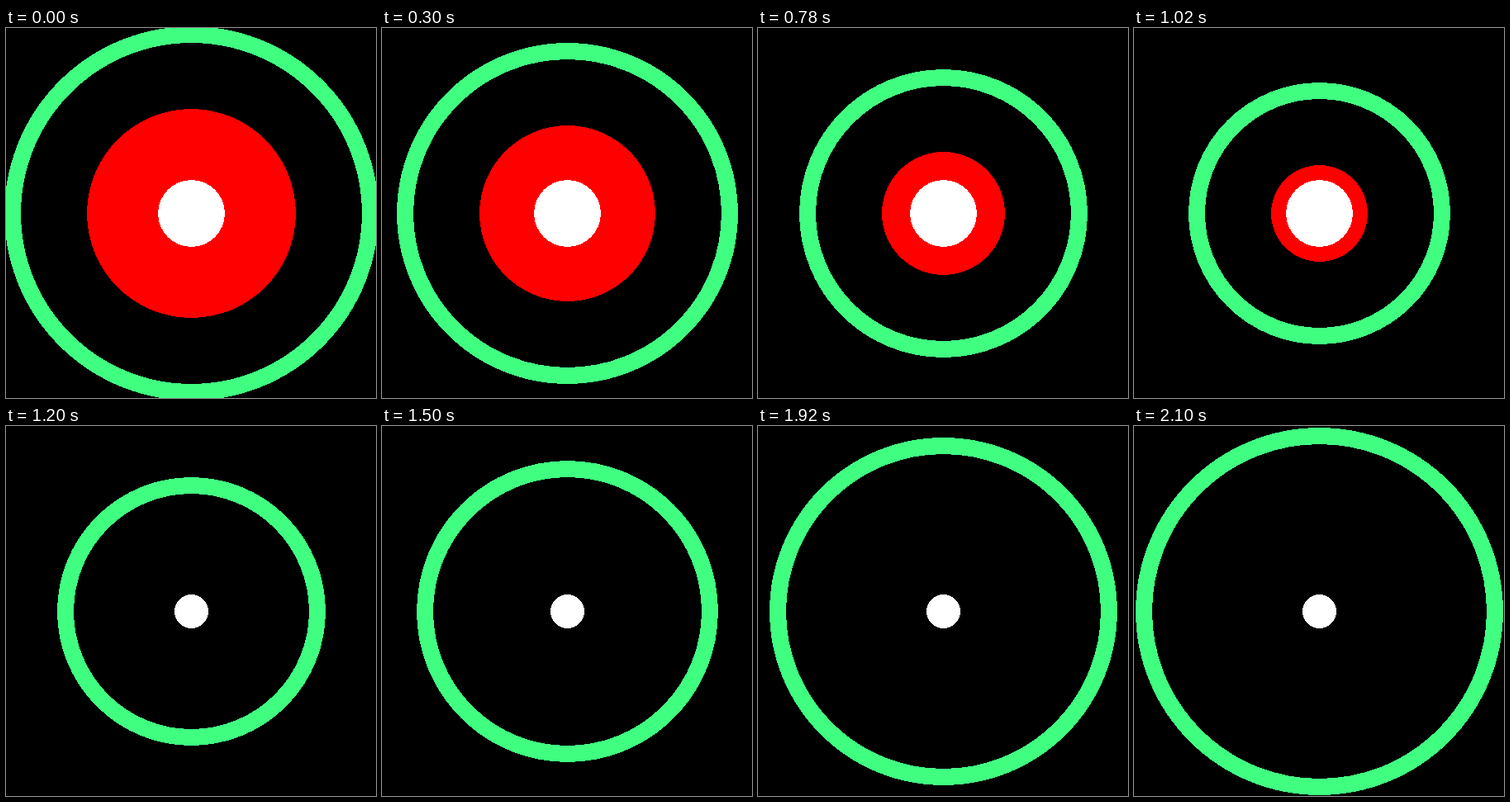
Animation of 448 by 448 pixels, one loop 2160 ms. Source, as an HTML page:

```html
<!DOCTYPE html>
<html lang="en">
<head>
<meta charset="utf-8">
<title>Pulsing rings</title>
<style>
  html, body { margin: 0; width: 100%; height: 100%; overflow: hidden; background: #000; }
  svg { display: block; width: 100%; height: 100%; }
</style>
</head>
<body>
<svg viewBox="0 0 448 448" shape-rendering="crispEdges">
  <g transform="translate(224.5 224.5)">
    <circle id="ring" fill="none" stroke="#40ff80" stroke-width="20"/>
    <circle id="disc" fill="#f00"/>
    <circle id="core" fill="#fff"/>
  </g>
</svg>
<script>
  const STEP_MS = 60, STEPS = 36, HALF = STEPS / 2;
  const MIN_RADIUS = 154.45, GROWTH = 4;
  const [ring, disc, core] = ['ring', 'disc', 'core'].map(id => document.getElementById(id));

  function draw(ms) {
    const step = Math.floor(ms / STEP_MS) % STEPS;
    const shrinking = step < HALF;
    const radius = MIN_RADIUS + GROWTH * Math.abs(HALF - step);
    ring.setAttribute('r', radius - 10);
    disc.setAttribute('r', shrinking ? radius - 100 : 0);
    core.setAttribute('r', shrinking ? 40.45 : 20.45);
  }

  const start = performance.now();
  function tick() {
    draw(performance.now() - start);
    requestAnimationFrame(tick);
  }
  tick();
</script>
</body>
</html>
```
